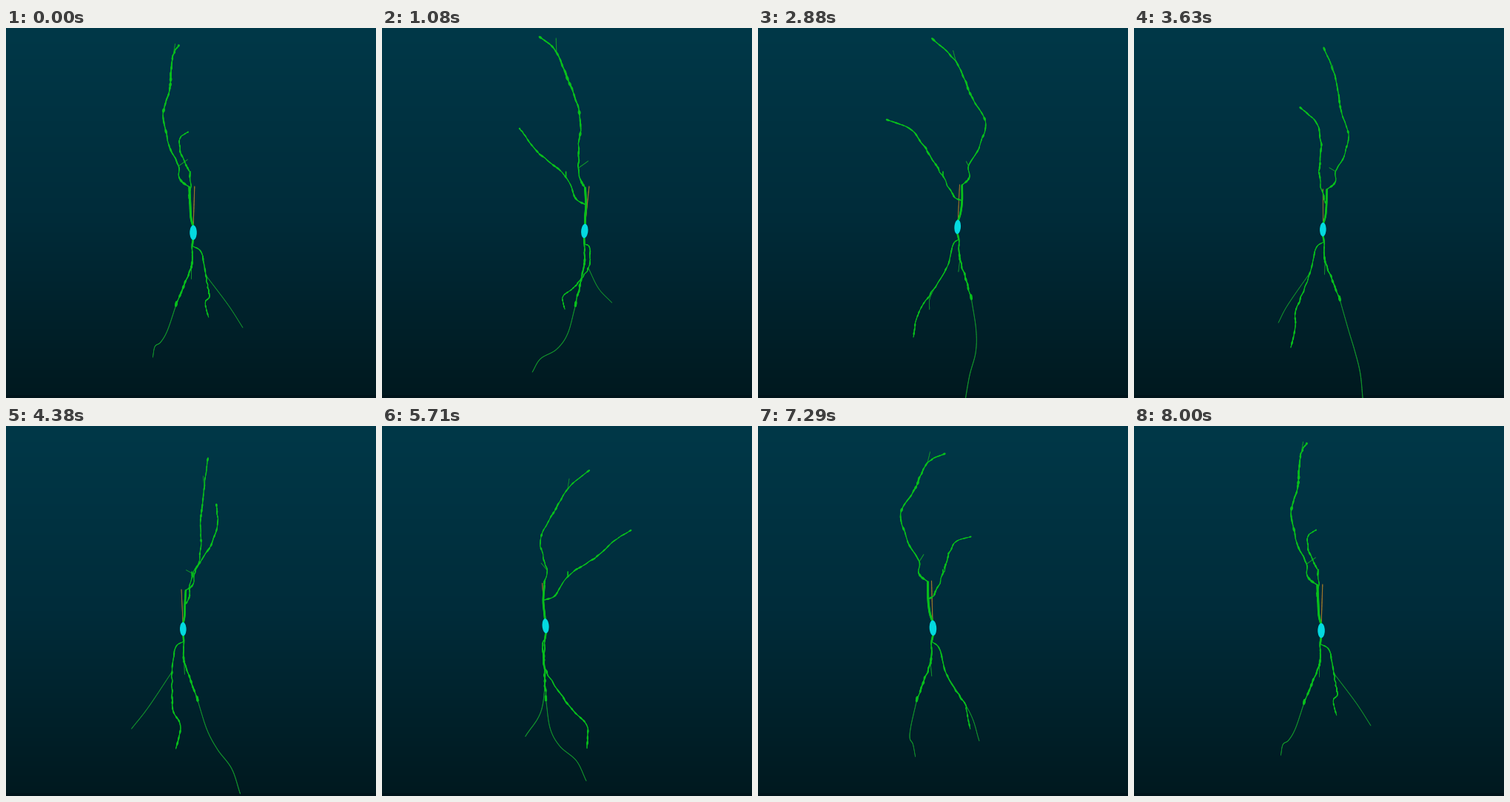
A matplotlib script for the animation above (8.04 s loop, 500x500 px).

```python
import numpy as np
import matplotlib.pyplot as plt
from matplotlib.animation import FuncAnimation
from matplotlib.collections import LineCollection
from matplotlib.colors import LinearSegmentedColormap
from matplotlib.patches import Ellipse

SIZE, DPI = 500, 100
STEPS = 193          # first and last pose coincide
LOOP = 8040
DIST = 462           # camera distance in pixels
PX = 72 / DPI        # points per pixel
STRIDE = 1.2         # sample spacing along a branch in pixels
rng = np.random.default_rng(11)

GREEN, THIN, GOLD, CYAN = "#08bf1c", "#12932c", "#a5782a", "#04d9e0"

fig = plt.figure(figsize=(SIZE / DPI, SIZE / DPI), dpi=DPI)
ax = fig.add_axes([0, 0, 1, 1])
ax.set(xlim=(0, SIZE), ylim=(SIZE, 0))
ax.axis("off")

sky = LinearSegmentedColormap.from_list(
    "sky", ["#003848", "#002c3a", "#00191f"], N=512)
ax.imshow(np.linspace(0, 1, SIZE)[:, None], cmap=sky, aspect="auto",
          extent=(0, SIZE, SIZE, 0))
ax.axhspan(495.5, SIZE, color="#00141a", lw=0)


def spline(points):
    """Evenly sampled Catmull-Rom curve."""
    p = np.array(points, float)
    p = np.vstack([2 * p[0] - p[1], p, 2 * p[-1] - p[-2]])
    out = []
    for a, b, c, d in zip(p, p[1:], p[2:], p[3:]):
        n = max(2, int(np.linalg.norm(c - b) / STRIDE))
        t = np.linspace(0, 1, n, endpoint=False)[:, None]
        out.append(b + .5 * t * (c - a + t * (2 * a - 5 * b + 4 * c - d
                                              + t * (3 * (b - c) + d - a))))
    return np.vstack(out + [p[-2:-1]])


def noise(n, gap):
    """Random values in -1..1, joined linearly every gap samples."""
    knots = rng.uniform(-1, 1, n // gap + 2)
    return np.interp(np.arange(n) / gap, np.arange(len(knots)), knots)


def beads(n):
    """Short swellings at random spacing along n samples."""
    s = np.arange(n) * STRIDE
    spots = np.cumsum(rng.uniform(3, 10, n))
    spots = spots[spots < s[-1]]
    gains = rng.uniform(.3, 1, len(spots)) ** 2
    return (gains * np.exp(-((s[:, None] - spots) / 1.5) ** 2)).sum(axis=1)


tubes = []


def branch(points, width, color=GREEN, beaded=False):
    curve = spline(points)
    n = len(curve)
    widths = np.full(n, float(width))
    if beaded:
        fade = np.sin(np.linspace(0, np.pi, n)) ** .5
        curve[:, 0] += 1.1 * fade * noise(n, 6)
        curve[:, 2] += 1.1 * fade * noise(n, 6)
        widths *= 1 + .3 * noise(n, 2) + 1.3 * beads(n)
    lines = ax.add_collection(
        LineCollection([], colors=color, capstyle="round"))
    tubes.append((lines, curve, widths[:-1]))


def twig(base, offset, width=.9, color=THIN):
    branch([base, np.add(base, offset)], width, color)


# Key points as (x, y up, z toward viewer), relative to the stage centre
SOMA, SOMA_AXIS = np.array((2.9, -19.8, 29)), np.array((0, 10, .9))
TOP, BOTTOM = SOMA + SOMA_AXIS * .8, SOMA - SOMA_AXIS * .8
FORK, CREST, CROTCH = (-1, 17, 34), (-2, 39, 33), (1.5, -37, 30)
ELBOW, TIP_FORK = (-15, 65, 33), (-22, 197, 4)
SPUR, TWIST, BULB, KNEE = (-1, 49.5, -1), (.5, -64, 31.5), (-20, -118, 34), (19, -79, 23)

twig(TOP, (1.5, 52, 4.5), 1, GOLD)
branch([BULB, (-32, -156, 31), (-42.5, -180, 20), (-53, -200, -1),
        (-58, -226, -13.5)], 1, THIN)
branch([KNEE, (51, -125, 18), (70, -152, 30)], .9, THIN)
twig(TWIST, (0, -19, -3))
twig(ELBOW, (11, 8, 6))
twig(TIP_FORK, (2.5, 15, -3))
twig(SPUR, (0, 6.5, 0), 1.5, GREEN)
branch([FORK, (-2, 23.5, 17), SPUR, (-14.5, 80, -40), (-16.5, 100, -62),
        (-4.5, 110, -89)], 1.2, beaded=True)
branch([CREST, (-14, 49.5, 36.5), ELBOW, (-25, 87.5, 42), (-31, 124, 50),
        (-26, 154, 31), TIP_FORK, (-16, 219, -31)], 1.35, beaded=True)
branch([CROTCH, (14, -47, 29), KNEE, (27, -126, -12), (21.5, -144, -29),
        (27, -169, -30)], 1.25, beaded=True)
branch([CROTCH, TWIST, BULB], 1.5, beaded=True)
twig(BULB, (1, 5, 0), 3.2, GREEN)
branch([BOTTOM, CROTCH], 2.5)
branch([TOP, (0, 0, 32), FORK, CREST], 2.7)

soma = ax.add_patch(Ellipse((0, 0), 1, 1, color=CYAN, lw=0, zorder=3))


def project(p, step):
    """Orbit with a slowly nodding camera; returns screen x, y and scale."""
    a = 2 * np.pi * step / (STEPS - 1)
    tilt = -.195 * np.cos(a) - .17 * np.sin(a)
    x, y, z = np.asarray(p, float).T
    x, z = x * np.cos(a) + z * np.sin(a), z * np.cos(a) - x * np.sin(a)
    y, z = (y * np.cos(tilt) + z * np.sin(tilt),
            z * np.cos(tilt) - y * np.sin(tilt))
    k = DIST / (DIST - z)
    return SIZE / 2 + k * x, SIZE / 2 - k * y, k


def draw(step):
    for lines, curve, widths in tubes:
        x, y, k = project(curve, step)
        xy = np.column_stack([x, y])
        lines.set_segments(np.stack([xy[:-1], xy[1:]], axis=1))
        lines.set_linewidths(widths * k[:-1] * PX)
    x, y, k = project([SOMA - SOMA_AXIS, SOMA, SOMA + SOMA_AXIS], step)
    dx, dy = x[2] - x[0], y[2] - y[0]
    soma.set_center((x[1], y[1]))
    soma.set_width(9 * k[1])
    soma.set_height(np.hypot(dx, dy))
    soma.set_angle(np.degrees(np.arctan2(-dx, dy)) % 180)
    return [t[0] for t in tubes] + [soma]


anim = FuncAnimation(fig, draw, frames=STEPS, interval=LOOP / STEPS,
                     repeat=True, repeat_delay=0)
plt.show()
```
